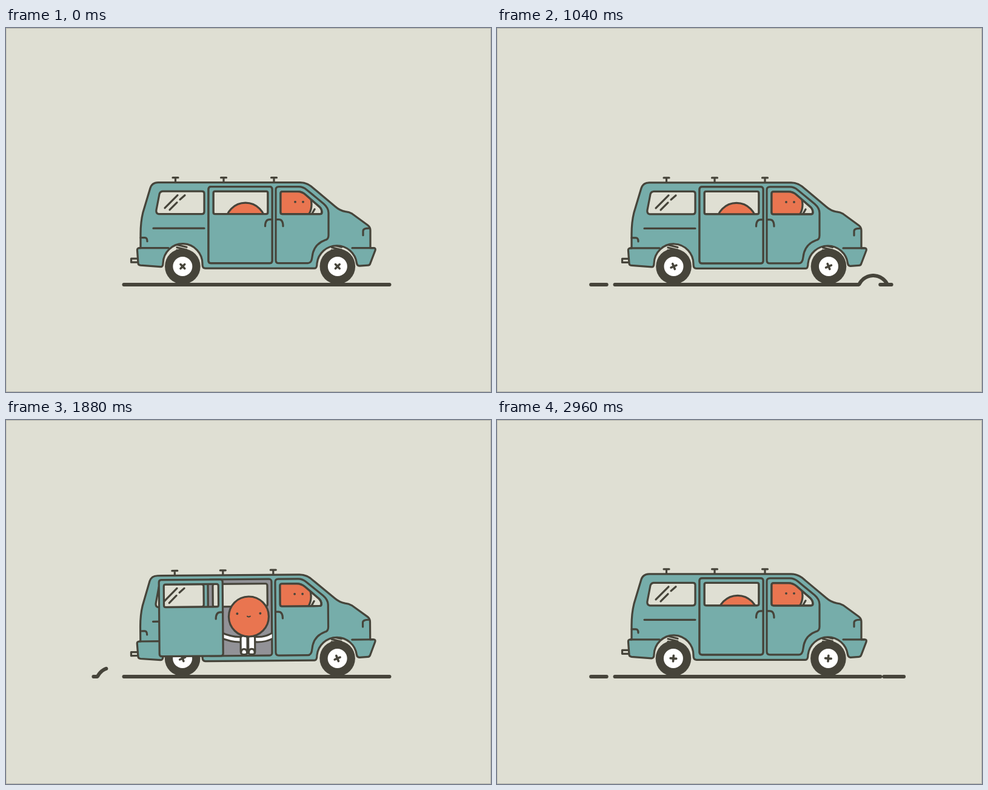
Write an HTML page that moves like this. It is 800x600 px and loops after 3000 ms.

```html
<!DOCTYPE html>
<html lang="en">
<head>
<meta charset="utf-8">
<title>Van ride</title>
<style>
  html, body { margin: 0; width: 100%; height: 100%; overflow: hidden; background: #dfdfd3; }
  svg { display: block; width: 100vw; height: 100vh; }
  .line { fill: none; }
  .teal { fill: #76adaa; }
  .pale { fill: #dfdfd3; }
  .grey { fill: #929297; }
  .skin { fill: #e97550; }
  .white { fill: #fff; }
  .dark { fill: #46443a; stroke: none; }
</style>
</head>
<body>
<svg viewBox="0 0 800 600" stroke="#46443a" stroke-width="3.2" stroke-linecap="round" stroke-linejoin="round">
  <defs>
    <clipPath id="opening"><rect x="334" y="262" width="105" height="126"/></clipPath>
    <path id="pane" d="M453 273Q453 270 456 270H481Q488 270 494 275L517 295Q521 299 521 304Q521 307 518 307H456Q453 307 453 304Z"/>
    <clipPath id="cab"><use href="#pane"/></clipPath>
    <path id="rack" d="M0 254V247M-4.5 247H4.5"/>
    <path id="spring" d="M-8 357.5L8 361.5M-8 362L8 366M-8 366.5L8 370.5"/>
    <g id="leg">
      <rect x="-5.5" y="355" width="11" height="31" rx="4.5"/>
      <path class="line" d="M-5 384Q-5 377 0 377Q5 377 5 384"/>
    </g>
    <g id="tyre">
      <circle class="dark" r="29.3"/>
      <circle class="white" r="16" stroke="none"/>
    </g>
    <path id="cross" d="M-3.4 -3.4L3.4 3.4M3.4 -3.4L-3.4 3.4" stroke-width="3.6"/>
  </defs>

  <rect class="pale" width="800" height="600" stroke="none"/>
  <path id="road" class="line" stroke-width="6"/>
  <path id="puffs" class="line" stroke-width="3.4"/>

  <g class="chassis">
    <use href="#rack" x="279.5"/><use href="#rack" x="359"/><use href="#rack" x="442"/>
    <use href="#spring" x="290"/><use href="#spring" x="545.5"/>
    <rect class="pale" x="206.5" y="380.5" width="12" height="6"/>
    <path class="teal" d="M222 363V340Q222 320 226 304L238 264Q241 255 251 255H485Q495 255 503 261L543 294.5Q551 301.5 560 303Q566 303.5 571 306.5L597 325.5Q601 328.5 601 334V363H607Q610 363 609 367L601 388Q600 391.5 597 391.5L583 392.5Q579 392 578.5 388A33 33 0 0 0 513 388Q513 396.5 509 396.5H329Q324 396.5 324 390A32.5 33 0 0 0 259 388Q259 394 255 394L222 391.5Q218 391 218 388L216.5 367Q216 363 220 363Z"/>
    <path class="line" d="M220 363H268M571 363H606M243 330.5H327M222 346H229Q233 346 233 352M589 342V335Q589 330 600 330.5"/>
    <path class="pale" d="M258 269.5H323Q327 269.5 327 273V303Q327 307 323 307H252Q247 306 248 300L253 274Q254 270 258 269.5Z"/>
    <path class="line" d="M262 297L283 276M287 283L295 276M270 300L282 288"/>

    <rect class="grey" x="334" y="262" width="105" height="126" rx="4"/>
    <rect class="pale" x="342" y="269.5" width="90" height="37.5" rx="3"/>
    <g clip-path="url(#opening)">
      <path id="armEdges" class="line" stroke-width="11.5"/>
      <path id="armFill" class="line" stroke="#fff" stroke-width="5.4"/>
      <g id="rider">
        <use href="#leg" class="white" x="-8.2"/><use href="#leg" class="white" x="4.4"/>
        <g id="head">
          <circle class="skin" r="33"/>
          <g id="face">
            <circle class="dark" cx="-19" cy="-5" r="2"/><circle class="dark" cx="19" cy="-5" r="2"/>
            <path class="line" d="M-2.5 -.5Q0 1.5 2.5 -.5" stroke-width="2"/>
          </g>
        </g>
      </g>
    </g>

    <path class="line" d="M445 267Q445 262 450 262H483Q490 262 496 267L524 290Q532 297 532 305V342Q532 349 526 350Q507 357 505 378Q504 388 498 388H450Q445 388 445 383ZM446 316H450Q457 316 457 327"/>
    <use href="#pane" class="pale"/>
    <g clip-path="url(#cab)">
      <path d="M505 306L509 299"/>
      <g id="driver">
        <circle class="skin" cx="472" cy="291" r="32"/>
        <circle class="dark" cx="477" cy="287" r="1.9"/><circle class="dark" cx="490" cy="287" r="1.9"/>
      </g>
    </g>
    <use href="#pane" class="line"/>
  </g>

  <g id="rearWheel"><use href="#tyre"/><use class="cross" href="#cross"/></g>
  <g id="frontWheel"><use href="#tyre"/><use class="cross" href="#cross"/></g>

  <g class="chassis">
    <g id="door">
      <path class="teal" fill-rule="evenodd" d="M338 262H435Q439 262 439 266V384Q439 388 435 388H338Q334 388 334 384V266Q334 262 338 262ZM345 269.5Q342 269.5 342 272.5V304Q342 307 345 307H429Q432 307 432 304V272.5Q432 269.5 429 269.5Z"/>
      <path class="line" d="M439 316H435Q427.5 316 427.5 327"/>
    </g>
  </g>
  <rect x=".5" y=".5" width="799" height="599" class="line" stroke="#b4b4aa" stroke-width="1"/>
</svg>
<script>
const LOOP = 3000, STEP = 40;
const REAR = 291.5, FRONT = 547, AXLE = 393, GROUND = 423;
const ROAD_LEFT = 194.5, ROAD_RIGHT = 632.5;
const FRONT_HIT = 1120, REAR_HIT = 1600, HOP_TIME = 240, HOP_ANGLE = 12.4;
const $ = id => document.getElementById(id);
const move = (id, x, y = 0) => $(id).setAttribute('transform', `translate(${x} ${y})`);

// Smooth 0 to 1 between two times.
function ramp(t, from, to) {
  const p = Math.min(1, Math.max(0, (t - from) / (to - from)));
  return p * p * (3 - 2 * p);
}

// The bump travels left, slowing slightly.
function bumpX(t) {
  const s = t - REAR_HIT;
  return 304 - .497 * s + .000122 * s * s;
}

// Leap over the bump, then a short dip of the suspension.
function hop(u) {
  const x = u / HOP_TIME;
  if (x <= 0 || x >= 1.4) return 0;
  return x < 1 ? HOP_ANGLE * Math.sin(Math.PI * x ** .8) : -.5 * Math.sin(Math.PI * (x - 1) / .4);
}

function stretch(a, b, bump) {
  if (b < a) return '';
  const points = [];
  const add = x => {
    const dx = x - bump;
    const y = Math.abs(dx) < 23.5 ? 434 - Math.sqrt(25.9 ** 2 - dx * dx) : GROUND;
    points.push(x.toFixed(1) + ' ' + y.toFixed(1));
  };
  for (let x = a; x < b; x++) add(x);
  add(b);
  return 'M' + points.join('L');
}

// A dash whose left end runs ahead and whose right end catches up.
function dash(u, from, distance) {
  const p = u / 280;
  if (p <= 0 || p >= 1) return '';
  return stretch(from - distance * (1 - (1 - p) ** 3), from - distance * p ** 1.2, -LOOP);
}

function roadPath(t) {
  const bump = bumpX(t);
  const leaving = bump < REAR + 90 && bump > 70;
  let d = stretch(ROAD_LEFT, ROAD_RIGHT, bump > ROAD_LEFT ? bump : -LOOP);
  d += dash(t % 400, 712, 80);
  if (!leaving) d += dash(t % 480, ROAD_LEFT, 62);
  if (bump < 721) d += stretch(Math.max(bump - 30, ROAD_RIGHT), Math.min(bump + 30, 721), bump);
  if (leaving) d += stretch(bump - 30, Math.min(ROAD_LEFT, 1.2 * bump - 44), bump);
  return d;
}

function puffPath(t) {
  let d = '';
  [710, 2330].forEach((start, burst) => {
    const u = t - start;
    if (u <= 0 || u >= 240) return;
    const half = 8 * Math.sin(Math.PI * u / 240);
    for (let i = 0; i < 2; i++) {
      const x = 204 - .45 * u + (burst ? 14 : -14) * i;
      d += `M${x - half} ${372 + 12 * i * (burst + 1)}h${2 * half}`;
    }
  });
  return d;
}

function placeWheel(id, x, angle, t) {
  const lift = Math.max(0, (FRONT - REAR) * Math.sin(angle * Math.PI / 180) * .88);
  move(id, x, AXLE - lift);
  $(id).querySelector('.cross').setAttribute('transform', `rotate(${t * .108})`);
}

function render(t) {
  const frontHop = hop(t - FRONT_HIT), rearHop = hop(t - REAR_HIT);
  const leap = Math.max(0, frontHop, rearHop) / 9.5;
  const bob = -.75 - .75 * Math.cos(2 * Math.PI * (t / 200 - .65));

  $('road').setAttribute('d', roadPath(t));
  $('puffs').setAttribute('d', puffPath(t));

  const pose = `translate(0 ${bob}) rotate(${-frontHop} ${REAR} ${AXLE}) rotate(${rearHop} ${FRONT} ${AXLE})`;
  document.querySelectorAll('.chassis').forEach(g => g.setAttribute('transform', pose));
  placeWheel('rearWheel', REAR + bob * .5, rearHop, t);
  placeWheel('frontWheel', FRONT + bob * .5, frontHop, t);

  const door = -82 * (ramp(t, 1120, 1940) - ramp(t, 2360, 2800));
  move('door', door);
  move('driver', -4 * leap, -8 * leap);

  const headX = 395 + 6 * ramp(t, 1600, 1880) - 4 * ramp(t, 1880, 2960);
  const headY = 321.5 + 2 * ramp(t, 1280, 1600) - 2.5 * leap;
  move('rider', headX);
  move('head', 0, headY);
  move('face', -7 * ramp(t, 2200, 2480));

  const reach = ramp(t, 1600, 1800) - ramp(t, 2600, 2800);
  const sag = 5 * ramp(t, 1880, 2480);
  const grip = 439 + door, tip = headX + 8 + reach * (434 - headX);
  const arms = reach > 0
    ? `M${headX - 12} 361Q${(headX - 12 + grip) / 2} ${362 - sag} ${grip - 3} ${354 - sag}`
      + `M${headX + 8} 361Q${(headX + 14 + tip) / 2} ${363 + sag} ${tip} ${354 + sag}`
    : '';
  $('armEdges').setAttribute('d', arms);
  $('armFill').setAttribute('d', arms);
}

function tick(now) {
  render(Math.floor(now % LOOP / STEP) * STEP);
  requestAnimationFrame(tick);
}
render(0);
requestAnimationFrame(tick);
</script>
</body>
</html>
```
